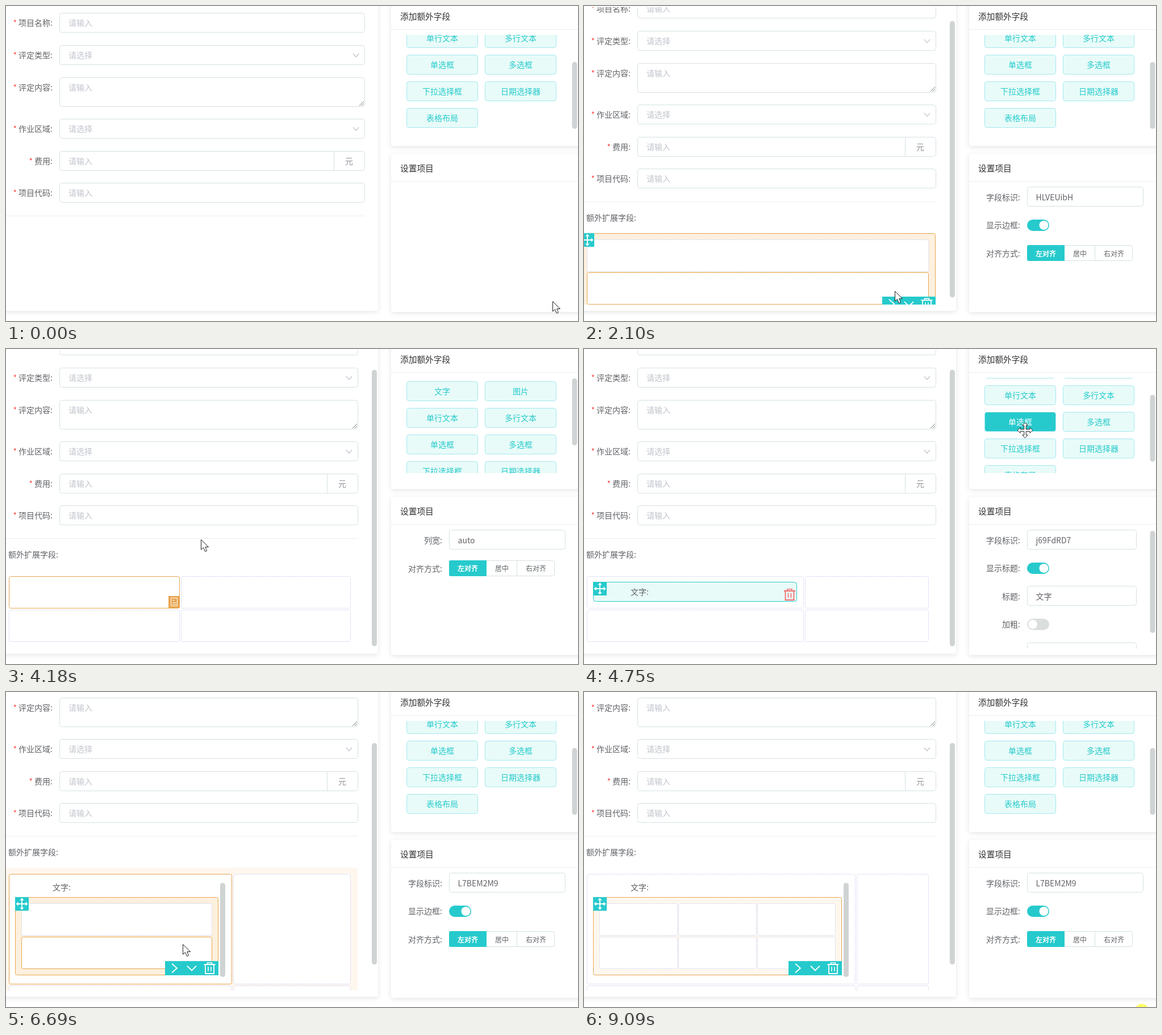
An HTML page with a canvas for the animation above (9190 ms loop, 1007 px wide and 556 px high).

```html
<!DOCTYPE html>
<html lang="zh">
<head>
<meta charset="utf-8">
<style>
  html, body { margin: 0; width: 100%; height: 100%; overflow: hidden; background: #fff; }
  canvas { display: block; }
</style>
</head>
<body>
<canvas id="stage" width="1007" height="556"></canvas>
<script>
const ctx = document.getElementById('stage').getContext('2d');
const LOOP = 9190;
const TEAL = '#26cacc', ORANGE = '#e8a550', LABEL = '#606266', HINT = '#c0c4cc';
const BORDER = '#d6e1e4', LINE = '#ebeef2', THUMB = '#d0d3d4', DASH = '#d9daf3';
const PALE = '#e8fbf8', PALE_BORDER = '#a4e8f0';
const TINT = 'rgba(243,150,40,.08)';

// Keys are [time, ...values], joined linearly.
const POINTER = [
  [0, 962, 521], [50, 962, 521], [520, 775, 205], [620, 775, 205], [930, 380, 440],
  [1010, 380, 440], [1450, 584, 491], [1950, 584, 491], [2100, 547, 503], [2220, 541, 514],
  [2400, 541, 514], [2780, 210, 425], [2900, 210, 425], [3510, 746, 158], [3700, 768, 80],
  [3850, 768, 80], [4300, 190, 428], [4400, 190, 428], [4750, 776, 143], [4950, 772, 198],
  [5230, 772, 198], [5560, 340, 420], [5760, 344, 429], [6050, 316, 432], [6440, 316, 432],
  [6690, 311, 445], [6900, 297, 487], [7100, 297, 487], [7300, 341, 487], [8110, 341, 487],
  [8480, 985, 575], [9000, 982, 563]
];
const FORM_SCROLL = [[0, 0], [1960, 0], [2100, 25], [2180, 36], [5620, 36], [5760, 86], [5860, 116]];
const LIST_SCROLL = [[0, 65], [3530, 65], [3700, 0], [4600, 0], [4750, 40], [4900, 65]];
const CLICKS = [1600, 2320, 2860, 6160, 6980, 7680, 9090];

function at(keys, t) {
  const i = keys.findIndex(k => k[0] > t);
  if (i < 0) return keys[keys.length - 1].slice(1);
  const a = keys[i - 1], b = keys[i], p = (t - a[0]) / (b[0] - a[0]);
  return a.slice(1).map((v, n) => v + (b[n + 1] - v) * p);
}

// The border lies inside the given size.
function box(x, y, w, h, fill, stroke, r = 4, dash = []) {
  const inset = stroke ? .5 : 0;
  ctx.beginPath();
  ctx.roundRect(Math.round(x) + inset, Math.round(y) + inset,
    Math.round(w) - 2 * inset, Math.round(h) - 2 * inset, r);
  if (fill) { ctx.fillStyle = fill; ctx.fill(); }
  if (stroke) {
    ctx.setLineDash(dash);
    ctx.strokeStyle = stroke; ctx.lineWidth = 1; ctx.stroke();
    ctx.setLineDash([]);
  }
}

function rect(x, y, w, h, fill) {
  ctx.fillStyle = fill;
  ctx.fillRect(Math.round(x), Math.round(y), Math.round(w), Math.round(h));
}

function thumb(x, y, h) {
  ctx.beginPath(); ctx.roundRect(x, y, 9, h, 4.5);
  ctx.fillStyle = THUMB; ctx.fill();
}

function text(str, x, y, color = LABEL, align = 'left', size = 14, weight = 400) {
  ctx.font = `${weight} ${size}px "Noto Sans CJK SC", "Noto Sans CJK", sans-serif`;
  ctx.textAlign = align; ctx.textBaseline = 'middle';
  ctx.fillStyle = color; ctx.fillText(str, x, y);
}

function path(points, color, width = 1, x = 0, y = 0) {
  ctx.beginPath();
  points.forEach(([px, py]) => ctx.lineTo(x + px, y + py));
  ctx.strokeStyle = color; ctx.lineWidth = width; ctx.stroke();
}

function clipped(x, y, w, h, draw) {
  ctx.save();
  ctx.beginPath(); ctx.rect(x, y, w, h); ctx.clip();
  draw();
  ctx.restore();
}

function panel(x, y, w, h) {
  ctx.save();
  ctx.shadowColor = 'rgba(0,0,0,.11)'; ctx.shadowBlur = 10; ctx.shadowOffsetY = 2;
  box(x, y, w, h, '#fff');
  ctx.restore();
}

const inside = (p, x, y, w, h) => p[0] >= x && p[0] <= x + w && p[1] >= y && p[1] <= y + h;

function fourArrows(x, y, size, half, fill, stroke) {
  const arm = [[-half, -half], [-half, -.62], [-.36, -.62], [0, -1], [.36, -.62], [half, -.62]];
  ctx.beginPath();
  for (let k = 0; k < 4; k++) {
    const c = [1, 0, -1, 0][k], s = [0, 1, 0, -1][k];
    arm.forEach(([u, v]) => ctx.lineTo(x + (u * c - v * s) * size, y + (u * s + v * c) * size));
  }
  ctx.closePath();
  ctx.fillStyle = fill; ctx.fill();
  if (stroke) { ctx.strokeStyle = stroke; ctx.lineWidth = 1; ctx.stroke(); }
}

function trash(x, y, color) {
  path([[-10, -7], [10, -7]], color, 2, x, y);
  path([[-4, -7], [-4, -10], [4, -10], [4, -7]], color, 1.6, x, y);
  path([[-7.5, -7], [-7.5, 9], [7.5, 9], [7.5, -7]], color, 1.8, x, y);
  [-2.5, 2.5].forEach(d => path([[d, -3], [d, 5]], color, 1.6, x, y));
}

function handle(x, y) {
  rect(x, y, 24, 24, TEAL);
  fourArrows(Math.round(x) + 12, Math.round(y) + 12, 10.5, .09, '#fff');
}

function toolbar(right, bottom) {
  const x = right - 94, y = bottom - 12.5;
  rect(x, bottom - 25, 94, 25, TEAL);
  path([[-4, -8], [5, 0], [-4, 8]], '#fff', 1.8, x + 16, y);
  path([[-8, -4], [0, 4], [8, -4]], '#fff', 1.8, x + 47, y);
  trash(x + 78.5, y + .5, '#fff');
}

function tableFrame(x, y, right, bottom, hovered, selected) {
  if (hovered) box(x, y, right - x, bottom - y, TINT, null, 3);
  if (selected) box(x, y, right - x, bottom - y, TINT, ORANGE, 3);
}

function cell(x, y, w, h, active) {
  box(x, y, w, h, '#fff', active ? ORANGE : DASH, 3, active ? [] : [3, 1]);
}

function input(y, h, right, hint) {
  box(94, y, right - 94, h, '#fff', BORDER);
  text(hint, 110, y + 17.5, HINT);
}

function formRow(label, y, h, right, kind) {
  const middle = y + 18;
  text(label + ':', 82, middle, LABEL, 'right');
  text('*', 82 - label.length * 14 - 13.5, middle, '#f44', 'left');
  input(y, h, right, kind === 'select' ? '请选择' : '请输入');
  if (kind === 'select') path([[-5, -3], [0, 3], [5, -3]], HINT, 1.2, right - 16, middle);
  if (kind === 'area') {
    path([[-10, -2], [-2, -10]], '#777', 1, right, y + h);
    path([[-6, -2], [-2, -6]], '#777', 1, right, y + h);
  }
  if (kind === 'unit') {
    rect(right - 55, y, 1, h, BORDER);
    text('元', right - 28, middle, '#909399', 'center');
  }
}

function stateAt(t) {
  const step = (...times) => times.filter(v => t >= v).length;
  const s = {
    t, pointer: at(POINTER, t), scroll: at(FORM_SCROLL, t)[0], listScroll: at(LIST_SCROLL, t)[0],
    table: t >= 1000, rows: 1 + step(1700), cols: 1 + step(2350),
    label: t >= 4350, nested: t >= 5600, nestedRows: 1 + step(6440), nestedCols: 1 + step(7000, 7720),
    selected: ['', 'table', 'cell', 'label', 'nested'][step(1000, 2870, 4350, 5600)]
  };
  s.firstHeight = s.nested ? 77 + 59 * s.nestedRows : 57;
  s.tableBottom = 437 + s.firstHeight + (s.rows - 1) * 58.5 + 11;
  s.contentHeight = s.table ? s.tableBottom - 2 : 0;
  s.overflow = s.contentHeight > 525;
  return s;
}

function nestedTable(s, top, right, hovered) {
  const inner = s.nestedRows > 1 ? 4 : 0;
  const y = top + 45 - inner, end = right - 24, bottom = y + 20.5 + 58.5 * s.nestedRows;
  text('文字:', 82, top + 28 - inner);
  const over = hovered && inside(s.pointer, 16, y, end - 16, bottom - y);
  tableFrame(16, y, end, bottom, over, true);
  const stepX = (end - 11 - 27 + 1) / s.nestedCols;
  for (let r = 0; r < s.nestedRows; r++)
    for (let c = 0; c < s.nestedCols; c++) {
      const x = 27 + c * stepX, cy = y + 11 + r * 58.5;
      cell(x, cy, stepX - 1, 57, s.t > 5900 && inside(s.pointer, x, cy, stepX, 57));
    }
  handle(16, y);
  toolbar(end, Math.round(bottom));
  thumb(right - 21, top + (inner ? 16 : 11), s.firstHeight - 29);
}

function labelWidget(top, right) {
  box(16, top + 10, right - 28, 35, PALE, TEAL);
  handle(16, top + 10);
  text('文字:', 82, top + 28);
  trash(right - 25, top + 33, '#f56c6c');
}

function extraTable(s) {
  const top = 437 - s.scroll, bottom = s.tableBottom - s.scroll;
  const end = s.overflow ? 607 : 619;
  const hovered = inside(s.pointer, 0, top - 11, end + 12, Math.min(bottom, 527) - top + 11);
  const half = Math.round((5 + end) / 2 - .5);
  const split = s.cols === 1 ? end : !s.label ? half
    : s.nestedRows === 1 ? 387 : 358 + 40 * s.nestedCols;
  tableFrame(-6, top - 11, end + 12, bottom, hovered, s.selected === 'table');
  for (let r = 0; r < s.rows; r++)
    for (let c = 0; c < s.cols; c++) {
      const x = c ? split + 2 : 5, w = (c ? end : split) - x;
      const y = r ? top + s.firstHeight + 1.5 : top, h = r ? 57 : s.firstHeight;
      const picked = s.selected === 'cell' && !r && !c;
      cell(x, y, w, h, picked || inside(s.pointer, x, y, w, h));
      if (picked) {
        rect(x + w - 20, y + h - 22, 20, 21, ORANGE);
        box(x + w - 16, y + h - 19, 12, 15, null, '#fff', 0);
        [0, 4, 7].forEach((d, i) => rect(x + w - 13, y + h - 15 + d, i ? 7 : 4, 1.4, '#fff'));
      }
    }
  if (s.nested) nestedTable(s, top, split, hovered);
  else if (s.label) labelWidget(top, split);
  if (s.selected === 'table') {
    handle(-6, top - 11);
    toolbar(end + 12, bottom);
  }
}

function drawForm(s) {
  panel(-10, -10, 665, 548);
  const right = s.overflow ? 620 : 632, y = -s.scroll;
  clipped(0, 2, 640, 525, () => {
    formRow('项目名称', y + 12, 35, right);
    formRow('评定类型', y + 69, 35, right, 'select');
    formRow('评定内容', y + 126, 52, right, 'area');
    formRow('作业区域', y + 199, 35, right, 'select');
    formRow('费用', y + 256, 35, right, 'unit');
    formRow('项目代码', y + 312, 35, right);
    rect(0, y + 370, right, 1, LINE);
    if (s.table) {
      text('额外扩展字段:', 4, y + 399);
      extraTable(s);
    }
  });
  if (s.overflow) {
    const ratio = 525 / s.contentHeight;
    thumb(644, 3 + s.scroll * ratio, 525 * ratio - 3);
  }
}

function drawFieldList(s) {
  panel(678, -10, 340, 257);
  text('添加额外字段', 694, 18, '#303133', 'left', 14.7);
  rect(678, 41, 329, 1, LINE);
  const names = ['文字', '图片', '单行文本', '多行文本', '单选框', '多选框', '下拉选择框', '日期选择器', '表格布局'];
  let over = false;
  clipped(678, 51, 315, 168, () => names.forEach((name, i) => {
    const x = i % 2 ? 843 : 705, y = 57 - s.listScroll + 47 * (i >> 1);
    const hot = inside(s.pointer, x, y, 126, 35) && inside(s.pointer, 678, 51, 315, 168);
    over = over || hot;
    box(x, y, 126, 35, hot ? TEAL : PALE, PALE_BORDER);
    text(name, x + 63, y + 18, hot ? '#fff' : TEAL, 'center');
  }));
  thumb(996.5, 52 + s.listScroll * .72, 118);
  return over;
}

function setting(label, y) { text(label + ':', 768, y, LABEL, 'right'); }

function settingInput(label, y, value, right = 985) {
  setting(label, y);
  box(780, y - 19, right - 780, 35, '#fff', BORDER);
  text(value, 795.5, y);
}

function settingSwitch(label, y, on) {
  setting(label, y);
  box(780, y - 10, 39, 20, on ? TEAL : '#dadedc', null, 10);
  ctx.beginPath(); ctx.arc(on ? 809.5 : 790, Math.round(y), 8, 0, 7);
  ctx.fillStyle = '#fff'; ctx.fill();
}

function settingAlign(y) {
  setting('对齐方式', y);
  box(780, y - 15, 186, 28, '#fff', BORDER, 3);
  box(780, y - 15, 66, 28, TEAL, null, [3, 0, 0, 3]);
  rect(899, y - 15, 1, 28, BORDER);
  text('左对齐', 813, y, '#fff', 'center', 12, 700);
  text('居中', 873, y, LABEL, 'center', 12, 500);
  text('右对齐', 933, y, LABEL, 'center', 12, 500);
}

function drawSettings(s) {
  panel(678, 261, 340, 279);
  text('设置项目', 694, 286, '#303133', 'left', 14.7);
  rect(678, 308.5, 329, 1, LINE);
  clipped(678, 310, 329, 219, () => {
    if (s.selected === 'cell') {
      settingInput('列宽', 338, 'auto');
      settingAlign(387.5);
    } else if (s.selected === 'label') {
      settingInput('字段标识', 338, 'j69FdRD7', 973);
      settingSwitch('显示标题', 387, true);
      settingInput('标题', 437, '文字', 973);
      settingSwitch('加粗', 486, false);
      box(780, 518, 193, 35, '#fff', BORDER);
      thumb(996.5, 321, 180);
    } else if (s.selected) {
      settingInput('字段标识', 338, s.nested ? 'L7BEM2M9' : 'HLVEUibH');
      settingSwitch('显示边框', 387, true);
      settingAlign(437);
    }
  });
}

function drawPointer(s, grabbing) {
  const [x, y] = s.pointer.map(Math.round);
  if (CLICKS.some(c => s.t >= c && s.t < c + 100)) {
    ctx.beginPath(); ctx.arc(x, y, 12.5, 0, 7);
    ctx.fillStyle = 'rgba(255,255,70,.85)'; ctx.fill();
  }
  if (grabbing) return fourArrows(x + .5, y + .5, 13.5, .13, '#fff', '#222');
  ctx.beginPath();
  [[0, 0], [0, 17.5], [4, 14], [7, 21], [10, 19.5], [7.3, 13], [13, 13]]
    .forEach(([dx, dy]) => ctx.lineTo(x + .5 + dx, y + .5 + dy));
  ctx.closePath();
  ctx.fillStyle = '#fff'; ctx.fill();
  ctx.strokeStyle = '#222'; ctx.lineWidth = 1; ctx.stroke();
}

function frame() {
  const s = stateAt(performance.now() % LOOP);
  rect(0, 0, 1007, 556, '#fff');
  drawForm(s);
  const grabbing = drawFieldList(s);
  drawSettings(s);
  drawPointer(s, grabbing);
  requestAnimationFrame(frame);
}
frame();
</script>
</body>
</html>
```
